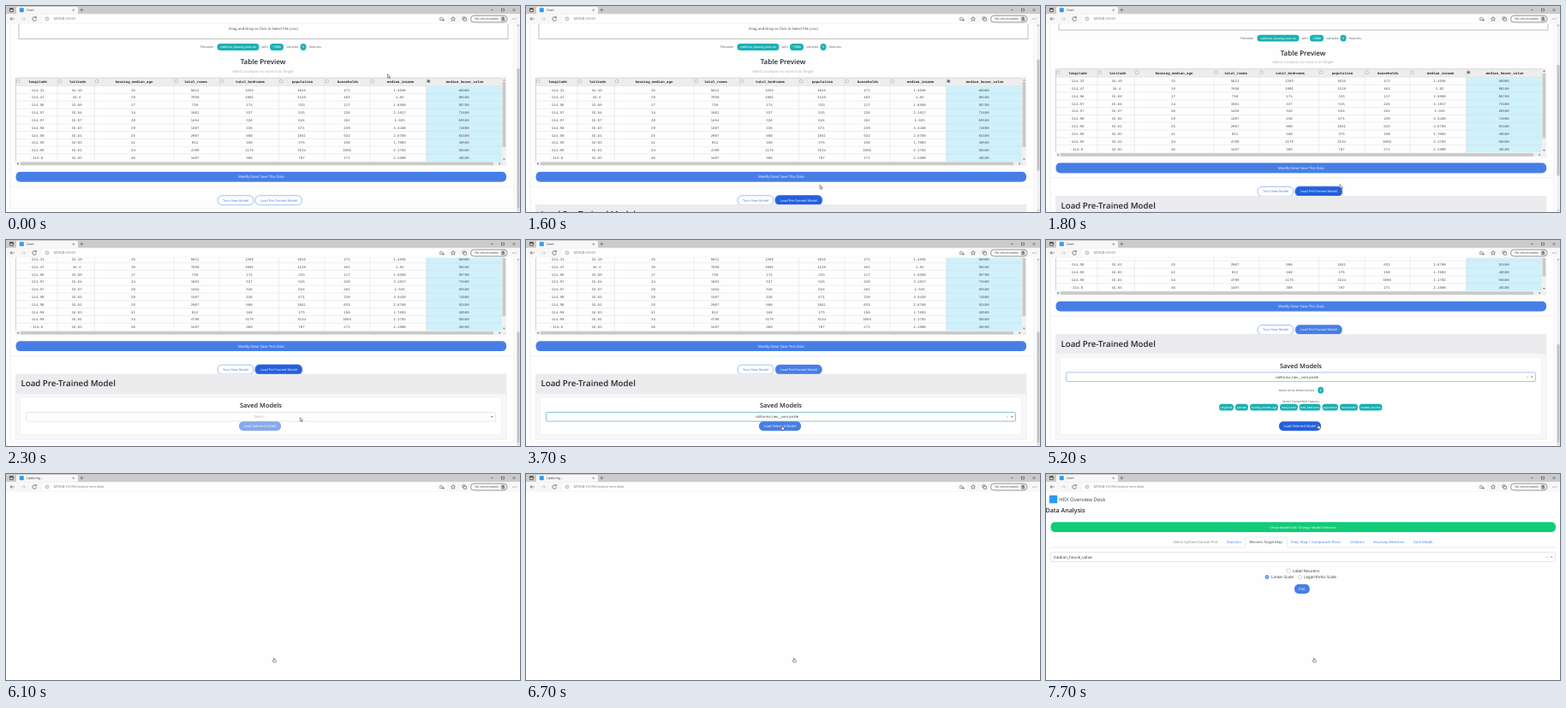
An HTML page that plays this animation: 600x241 px, repeating every 7800 ms.

```html
<!DOCTYPE html>
<html lang="en">
<head>
<meta charset="utf-8">
<title>Model loading walkthrough</title>
<style>
html, body { margin: 0; width: 100%; height: 100%; overflow: hidden; background: #fefefe; }
svg { display: block; width: 600px; height: 241px; text-rendering: geometricPrecision; }
text { font-family: "Open Sans", "Noto Sans", sans-serif; white-space: pre; }
.mono { font-family: "Liberation Mono", "DejaVu Sans Mono", monospace; }
</style>
</head>
<body>
<svg id="stage" viewBox="0 0 600 241" xmlns="http://www.w3.org/2000/svg"></svg>
<script>
const LOOP = 7800;
const BLUE = '#477ee6', DARK = '#2460dc', TEAL = '#1bb0b2', INK = '#30343a';

// --- markup helpers; text is placed by its vertical centre ---
const text = (x, y, s, size, fill = INK, extra = '') =>
  `<text x="${x}" y="${y + size * 0.36}" font-size="${size}" fill="${fill}" text-anchor="middle" ${extra}>${s}</text>`;
const left = (x, y, s, size, fill = INK, extra = '') =>
  text(x, y, s, size, fill, extra).replace('"middle"', '"start"');
const rect = (x, y, w, h, fill, extra = '') =>
  `<rect x="${x}" y="${y}" width="${w}" height="${h}" fill="${fill}" ${extra}/>`;
const path = (d, stroke, width = 0.5, extra = '') =>
  `<path d="${d}" fill="none" stroke="${stroke}" stroke-width="${width}" ${extra}/>`;
const circle = (x, y, r, fill, extra = '') =>
  `<circle cx="${x}" cy="${y}" r="${r}" fill="${fill}" ${extra}/>`;
const group = (id, body, extra = '') => `<g id="${id}" ${extra}>${body}</g>`;
const bold = 'font-weight="600"';
const line = (c, w = 0.5) => `stroke="${c}" stroke-width="${w}"`;

const button = (x, y, w, h, label, size, fill = BLUE) =>
  rect(x, y, w, h, fill, `rx="${Math.min(h * 0.45, 5)}"`) + text(x + w / 2, y + h / 2, label, size, '#fff');
const badge = (x0, x1, y, label, size) =>
  rect(x0, y - 3.9, x1 - x0, 7.8, TEAL, 'rx="3.6"') + text((x0 + x1) / 2, y - 0.1, label, size, '#fff', bold);
const cross = (x, y, r, c, w) => path(`M${x - r} ${y - r}l${2 * r} ${2 * r}m0 ${-2 * r}l${-2 * r} ${2 * r}`, c, w);
const caret = (x, y) => `<path d="M${x - 1.4} ${y - 0.7}h2.8l-1.4 1.6z" fill="#777"/>`;

function browser() {
  return rect(0, 0, 600, 9.5, '#cbcbcb')
    + `<path d="M12 9.5V2.5q0-1.5 1.5-1.5H82.500q1.500 0 1.500 1.500V9.500z" fill="#f7f7f7"/>`
    + rect(0, 9.3, 600, 11.4, '#f7f7f7')
    + rect(42, 10.6, 473, 9, '#fff', 'rx="2"')
    + rect(4.4, 2.8, 4, 3.8, 'none', line('#333', 0.7) + ' rx="0.6"') + rect(4.4, 2.8, 4, 1.2, '#333')
    + rect(15.8, 2.2, 5, 5, '#2d9bf0', 'rx="0.6"')
    + left(24, 4.8, '', 3.75, '#444', 'id="tabTitle"')
    + cross(78.700, 4.800, 1.100, '#444', 0.5)
    + path('M86.200 4.600h4.200m-2.100-2.100v4.200', '#444')
    + path('M566 4.600h3.200', '#333') + rect(578.700, 3.200, 2.800, 2.800, 'none', line('#333'))
    + cross(593, 4.600, 1.500, '#333')
    + path('M9.700 15h-4.800m2-2l-2 2l2 2', '#444', 0.6)
    + path('M17.700 15h4.800m-2-2l2 2l-2 2', '#bbb', 0.6)
    + path('M35 13.700a2.300 2.300 0 1 0 .4 1.800M35.300 12.300v1.700h-1.700', '#333', 0.6)
    + circle(48, 15, 2, 'none', line('#777')) + path('M48 14.500v1.700m0-2.600v.5', '#777')
    + left(55, 15, '127.0.0.1<tspan fill="#777">:8050</tspan><tspan id="urlPath" fill="#777"></tspan>', 3.85, '#333')
    + path('M508 12.800l.7 1.500l1.600.2l-1.200 1.100l.3 1.600l-1.400-.8l-1.400.8l.3-1.600l-1.200-1.100l1.600-.2z', '#555')
    + path('M509.500 16.500h2.400m-1.200-1.200v2.400', '#333')
    + path('M522 12.600l.8 1.600l1.700.2l-1.200 1.200l.3 1.700l-1.600-.8l-1.600.8l.3-1.700l-1.200-1.200l1.700-.2z', '#333')
    + rect(533, 12.900, 3.200, 3.200, 'none', line('#333') + ' rx="0.5"') + rect(534.300, 14.200, 3.200, 3.200, '#f7f7f7', line('#333') + ' rx="0.5"')
    + rect(542.500, 11.200, 42.500, 7.800, '#fbfbfb', line('#555', 0.6) + ' rx="3.900"')
    + text(561, 15, 'No sincronizado', 3.65, '#444')
    + circle(580.200, 15.100, 2.900, '#b9bdc2') + circle(580.200, 14.200, 1, '#555') + path('M578.600 16.800q1.600-2 3.200 0', '#555', 0.9)
    + [591.5, 593.3, 595.1].map(x => circle(x, 15, 0.45, '#333')).join('');
}

const EDGES = [11.5, 60, 103.5, 196, 249, 318.5, 372, 425, 490.5, 578.5];
const MIDS = [36, 82.5, 148.5, 220.5, 284, 345, 398, 459.5, 534.5];
const HEADS = 'longitude latitude housing_median_age total_rooms total_bedrooms population households median_income median_house_value'.split(' ');
const ROWS = `-114.31 34.19 15 5612 1283 1015 472 1.4936 66900
-114.47 34.4 19 7650 1901 1129 463 1.82 80100
-114.56 33.69 17 720 174 333 117 1.6509 85700
-114.57 33.64 14 1501 337 515 226 3.1917 73400
-114.57 33.57 20 1454 326 624 262 1.925 65500
-114.58 33.63 29 1387 236 671 239 3.3438 74000
-114.58 33.61 25 2907 680 1841 633 2.6768 82400
-114.59 34.83 41 812 168 375 158 1.7083 48500
-114.59 33.61 34 4789 1175 3134 1056 2.1782 58400
-114.6 34.83 46 1497 309 787 271 2.1908 48100`.split('\n').map(r => r.split(' '));

function table() {
  const top = 84, head = 9.6, pitch = 8.83, bottom = top + head + pitch * 10;
  let s = rect(11.5, top, 567, head, '#ededed') + rect(490.5, top + head, 88, pitch * 10, '#cff1fc');
  s += HEADS.map((h, i) => text(MIDS[i] + 1, top + 4.7, h, 4.05, '#222', 'class="mono" font-weight="bold"')
    + circle(EDGES[i] + 2.7, top + 4, 1.7, i === 8 ? '#777' : '#fff', line('#777', 0.45))).join('');
  ROWS.forEach((row, r) => {
    const y = top + head + pitch * r;
    s += path(`M11.5 ${y}H578.5`, '#d3d3d3', 0.4);
    s += row.map((v, i) => text(MIDS[i], y + 4.5, v, 4.05, '#4a4a4a', 'class="mono"')).join('');
  });
  s += EDGES.map(x => path(`M${x} ${top}V${bottom}`, '#d3d3d3', 0.4)).join('');
  s += path(`M11.5 ${bottom}V${top}H584`, '#bbb', 0.5);
  s += rect(11.5, bottom, 572.5, 5, '#f0f0f0') + rect(17, bottom + 0.7, 552, 3.6, '#c9c9c9');
  s += rect(578.8, top, 5.2, bottom - top, '#f1f1f1') + rect(579.6, top + 5, 3.6, 76, '#c9c9c9');
  const y = bottom + 2.5;
  s += `<path d="M12.700 ${y}l2-1.300v2.600zM577.500 ${y}l-2-1.300v2.600zM581.400 ${top + 1.5}l1.300 2h-2.600zM581.400 ${bottom - 1.500}l1.300-2h-2.600z" fill="#777"/>`;
  return s;
}

function details() {
  const ends = [202, 219, 221, 236, 238, 271, 273, 294, 295.5, 320.5, 322.5, 341, 343, 364, 365.5, 392.5];
  return text(292.5, 298, 'Model Vector Dimensionality', 3.1, '#444')
    + badge(317.3, 324, 298, '8', 3.2)
    + text(298, 311, 'Model Trained With Features:', 3.2, '#444')
    + HEADS.slice(0, 8).map((h, i) => badge(ends[2 * i], ends[2 * i + 1], 318, h, 3)).join('');
}

// Document coordinates equal stage coordinates at the first scroll position.
function setupPage() {
  const section = rect(11.5, 232.7, 572.5, 76, '#f7f7f9', `id="card" ${line('#e2e2e5')}`)
    + rect(11.5, 232.7, 572.5, 23, '#ececef')
    + left(17.5, 243.7, 'Load Pre-Trained Model', 9.7, '#24282e', bold)
    + rect(17, 259.7, 561.5, 43, '#fff', `id="inner" ${line('#ebebed')}`)
    + text(297.5, 269.5, 'Saved Models', 7.4, '#24282e', bold)
    + rect(23.5, 277.2, 548, 10.6, '#fff', 'id="select" rx="1.2"')
    + text(297, 282.4, '', 4.1, INK, 'id="choice"')
    + group('clear', cross(562, 282.5, 0.8, '#999', 0.4)) + caret(567.3, 282.5)
    + group('details', details())
    + group('loadBtn', rect(271.1, 287.1, 50.8, 12.8, '#a9c2f5', 'id="loadRing" rx="5.6"')
      + button(272, 288, 49, 11, 'Load Selected Model', 3.95))
    + group('menu', rect(23.5, 287.8, 548, 10.4, '#fff', line('#ccc'))
      + rect(24, 288.3, 547, 9.4, '#ebf5ff', 'id="option"') + text(297, 293, 'california_hex__som.pickle', 4.1));
  return path('M15 16V38.500H586V16', '#999', 0.6)
    + text(300.5, 26, 'Drag and Drop or Click to Select File (.csv)', 4.2, '#444')
    + text(234.5, 48, 'Filename', 3.6, '#555') + badge(246.5, 295.500, 48, 'california_housing_train.csv', 3.15)
    + text(302, 48, 'with', 3.6, '#555') + badge(308, 324, 48, '17000', 3.3)
    + text(334.5, 48, 'samples', 3.6, '#555') + badge(343.5, 350.500, 48, '9', 3.3)
    + text(361, 48, 'features', 3.6, '#555')
    + text(300, 65.2, 'Table Preview', 8, '#24282e', bold)
    + text(300, 76, 'Select a column to mark it as Target', 4.3, '#aaa')
    + table()
    + button(11.5, 194, 572.5, 11.8, 'Modify Data/ Save This Data', 4.1)
    + path('M5 211.200H593', '#e3e3e3')
    + rect(247, 221.8, 42, 11, '#fff', `${line(BLUE)} rx="5"`) + text(268, 227.2, 'Train New Model', 3.85, BLUE)
    + rect(290.1, 220.9, 56.3, 12.8, '#a9c2f5', 'id="pickRing" rx="5.600"')
    + rect(291.2, 221.8, 54.2, 11, '#fff', `id="pick" stroke-width="0.5" rx="5"`)
    + text(318.3, 227.2, 'Load Pre-Trained Model', 3.9, BLUE, 'id="pickText"')
    + path('', '#e3e3e3', 0.5, 'id="frame"')
    + group('section', section);
}

function analysisPage() {
  const tab = (x, s, c = BLUE) => left(x, 79.6, s, 4.15, c);
  const shell = rect(4, 25, 9.2, 9.2, '#2d9bf0', 'rx="0.8"')
    + left(15.3, 29.6, 'HEX Overview Desk', 6, '#3a3f45')
    + left(-0.5, 42.7, 'Data Analysis', 7.1, '#24282e', bold)
    + button(5.5, 56.200, 589.5, 11.800, 'Show Model Info/ Change Model Selection', 3.95, '#10cc78')
    + path('M5.500 86H232.500V75.500q0-1.500 1.500-1.500H280q1.500 0 1.500 1.500V86H595', '#d8dbe0')
    + tab(148.7, 'Select Splitted Dataset Part', '#888') + tab(211, 'Statistics') + tab(237.2, 'Winners Target Map', '#444')
    + tab(286, 'Freq. Map + Component Plans') + tab(355, 'U-Matrix') + tab(382, 'Anomaly Detection') + tab(429, 'Save Model');
  const form = rect(5.5, 91.7, 589, 10.8, '#fff', `${line('#ccc')} rx="1.2"`)
    + left(8.5, 97, 'median_house_value', 4.65) + cross(585, 97.2, 0.8, '#999', 0.4) + caret(590.3, 97.2)
    + rect(281, 111, 4.3, 4.3, '#fff', `${line('#aaa')} rx="0.8"`) + left(288, 113.2, 'Label Neurons', 4.65)
    + circle(258, 120.6, 2.3, BLUE) + circle(258, 120.6, 0.9, '#fff') + left(263, 120.6, 'Linear Scale', 4.65)
    + circle(296.5, 120.6, 2.1, '#fff', line('#aaa')) + left(301, 120.6, 'Logarithmic Scale', 4.65);
  return group('shell', shell) + group('form', form) + group('plot', button(290, 129, 17.8, 11, 'Plot', 4));
}

const ARROW = 'M0 0V4.600L1.100 3.600L1.900 5.300L2.600 5L1.800 3.400H3.200Z';
const HAND = 'M-.5 .3q.5-.6 1 0v1.700l1.700.5q.5.200.4.800l-.3 1.700h-2.700l-1.500-1.800q.1-.7.800-.2l.6.400z';

const stage = document.getElementById('stage');
stage.innerHTML = '<clipPath id="view"><rect y="20.7" width="600" height="220.3"/></clipPath>'
  + rect(0, 0, 600, 241, '#fefefe')
  + group('setup', `<g id="doc">${setupPage()}</g>`
    + rect(596, 20.7, 4, 220.3, '#f1f1f1') + rect(596.5, 0, 3, 10, '#c3c3c3', 'id="thumb"')
    + '<path d="M598 22l1 1.300h-2zM598 239.800l1-1.300h-2z" fill="#777"/>', 'clip-path="url(#view)"')
  + group('analysis', analysisPage())
  + browser()
  + `<path id="cursor" fill="#fff" stroke="#222" stroke-width="0.45" stroke-linejoin="round"/>`;

const parts = Object.fromEntries([...stage.querySelectorAll('[id]')].map(e => [e.id, e]));
const set = (id, attrs) => { for (const k in attrs) parts[id].setAttribute(k, attrs[k]); };
const show = (id, on) => set(id, { visibility: on ? 'inherit' : 'hidden' });
const label = (id, s) => { if (parts[id].textContent !== s) parts[id].textContent = s; };

const ease = u => u * u * (3 - 2 * u);
const ramp = (t, a, b) => ease(Math.min(1, Math.max(0, (t - a) / (b - a))));
const within = (t, a, b) => t >= a && t < b;

// [time, x, y] of the pointer tip
const POINTER = [[0, 445.5, 79.5], [200, 445.5, 79.5], [850, 322, 225], [1250, 322, 226], [1550, 343, 209.3],
  [2200, 343.3, 207.5], [2350, 343.3, 207.5], [2550, 335, 206], [2700, 335, 206], [2950, 312, 217], [3150, 312, 217],
  [3300, 299, 217], [4400, 299, 217], [4900, 317.8, 215.800], [5800, 317.8, 215.800], [6050, 312.8, 215.300], [LOOP, 312.8, 215.300]];

function pointerAt(t) {
  const i = Math.max(1, POINTER.findIndex(k => k[0] > t));
  const [a, b] = [POINTER[i - 1], POINTER[i]], u = ramp(t, a[0], b[0]);
  return [a[1] + (b[1] - a[1]) * u, a[2] + (b[2] - a[2]) * u];
}

function render(t) {
  const opened = t >= 1300, chosen = t >= 3100, known = t >= 3850, left = t >= 5900;

  // scroll position and page length
  const offset = 75.7 * ramp(t, 1680, 2200) + 46.6 * ramp(t, 3950, 4300);
  const extra = known ? 122.3 : opened ? 75.7 : 0;
  const length = 286 + extra;
  set('doc', { transform: `translate(0 ${-offset})` });
  set('thumb', { y: 24 + 213 * (66 + offset) / length, height: 213 * 220 / length });
  set('frame', { d: `M5 0V${237 + extra}H593V0` });

  // model choice button
  const hot = within(t, 800, 2500), filled = hot || opened;
  set('pick', { fill: hot ? DARK : filled ? BLUE : '#fff', stroke: hot ? DARK : BLUE });
  set('pickText', { fill: filled ? '#fff' : BLUE });
  show('pickRing', within(t, 1200, 2500));

  // saved models section
  show('section', opened);
  show('details', known);
  show('menu', within(t, 2600, 3100));
  show('option', t >= 2800 && t < 3100);
  show('clear', chosen);
  const grow = known ? 46.6 : 0;
  set('card', { height: 76.3 + grow });
  set('inner', { height: 43.3 + grow });
  set('select', { stroke: t < 2500 ? '#ccc' : known ? '#86aaf0' : '#5ba6c4', 'stroke-width': t < 2500 ? 0.5 : 0.7 });
  label('choice', chosen ? 'california_hex__som.pickle' : 'Select...');
  set('choice', { fill: chosen ? INK : '#aaa', x: chosen ? 293 : 297 });
  set('loadBtn', { transform: `translate(0 ${grow})`, opacity: t < 3200 ? 0.65 : 1 });
  parts.loadBtn.children[1].setAttribute('fill', t >= 4800 ? DARK : BLUE);
  show('loadRing', t >= 5500);

  // page change
  show('setup', !left);
  show('analysis', left);
  show('shell', t >= 6900);
  show('form', t >= 7200);
  show('plot', t >= 7400);
  label('tabTitle', within(t, 5900, 7500) ? 'Updating...' : 'Dash');
  label('urlPath', left ? '/analyse-som-data' : '');

  const [x, y] = pointerAt(t);
  const hand = within(t, 800, 1350) || within(t, 2850, 3850) || t >= 4250;
  set('cursor', { d: hand ? HAND : ARROW, transform: `translate(${x} ${y})` });
}

const start = performance.now();
function tick() {
  render((performance.now() - start) % LOOP);
  requestAnimationFrame(tick);
}
render(0);
requestAnimationFrame(tick);
</script>
</body>
</html>
```
